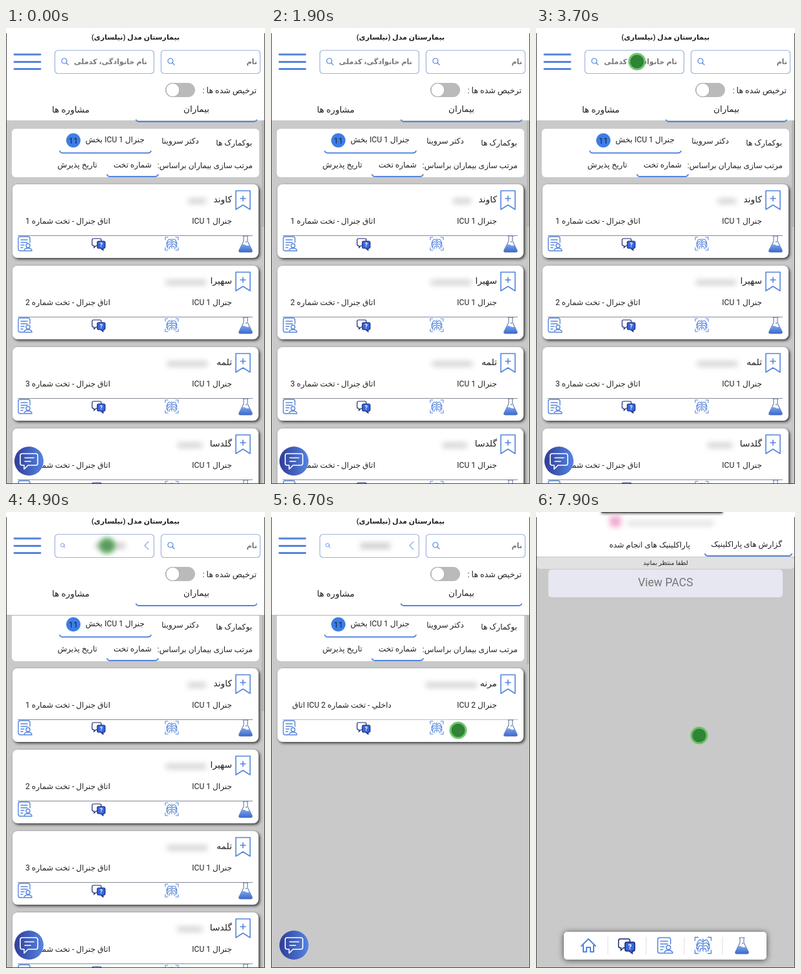
Write an HTML page that moves like this. It is 400x706 px and loops after 8 s.

```html
<!DOCTYPE html>
<html lang="fa">
<head>
<meta charset="utf-8">
<title>Patient list</title>
<style>
  html, body { margin: 0; width: 100%; height: 100%; overflow: hidden; background: #c9c9c9; }
  svg { display: block; }
  text { direction: rtl; font: 12.1px Roboto, 'DejaVu Sans', sans-serif; fill: #222; }
  .mid { text-anchor: middle; }
  .bold { font-weight: bold; }
  .line { fill: none; stroke: #5585dd; stroke-linecap: round; stroke-linejoin: round; }
  .card { fill: #fff; filter: drop-shadow(2px 2px 2px #333); }
  .blur { filter: blur(4px); }
  .step { opacity: 0; animation: 8s step-end infinite; }
  .typed { animation-name: typed; }
  #results { animation-name: results; }
  #report { animation-name: report; }
  #pointer { animation-name: pointer; }
  #path { animation: path 8s ease-in-out infinite; }
  #dot { animation: soften 8s step-end infinite; }
  @keyframes typed { 0% { opacity: 0 } 52.5% { opacity: 1 } }
  @keyframes results { 0% { opacity: 0 } 67.5% { opacity: 1 } }
  @keyframes report { 0% { opacity: 0 } 96.25% { opacity: 1 } }
  @keyframes pointer { 0% { opacity: 0 } 42.5% { opacity: 1 } }
  @keyframes soften {
    0%, 75% { filter: none; opacity: 1 }
    52.5% { filter: blur(3.5px); opacity: .75 }
  }
  @keyframes path {
    0%, 75% { transform: translate(156px, 52px) }
    82%, 85.5% { transform: translate(289px, 338px) }
    90%, 95.5% { transform: translate(257px, 337px) }
    97.5%, 100% { transform: translate(252px, 346px) }
  }
</style>
</head>
<body>
<svg width="400" height="706" viewBox="0 0 400 706">
  <defs>
    <linearGradient id="fabFill"><stop stop-color="#2f3d98"/><stop offset="1" stop-color="#5584e2"/></linearGradient>
    <linearGradient id="liquid" x2="0" y2="1"><stop stop-color="#7ba4ee"/><stop offset="1" stop-color="#3c69cc"/></linearGradient>

    <g id="flask">
      <path class="line" stroke-width="1.1" style="stroke:#5f779f" d="M-4-12H4M-3-12V-4L-10 10Q-11 13-8 13H8Q11 13 10 10L3-4V-12"/>
      <path fill="url(#liquid)" d="M-6.5 2Q-3 0 0 2T6.5 2L10 10Q11 13 8 13H-8Q-11 13-10 10Z"/>
      <circle cx="1" cy="-3" r="1" fill="#5585dd"/>
    </g>
    <g id="ribs" class="line" stroke-width="1.1">
      <path d="M-10-6V-10H-6M6-10H10V-6M10 6V10H6M-6 10H-10V6M0-8V7"/>
      <g id="ribSide"><path d="M-1-5Q-4-9-6-5T-8 0M-1-2Q-5-5-7 0T-7 4M-1 1Q-5-1-6 3T-6 7M-1 4Q-4 3-4 8"/></g>
      <use href="#ribSide" transform="scale(-1 1)"/>
    </g>
    <g id="chat">
      <path d="M-8-8H2Q4-8 4-6V1Q4 3 2 3H-4L-7 6V3H-8Q-10 3-10 1V-6Q-10-8-8-8Z" fill="#fff" stroke="#152072" stroke-width="1.2"/>
      <path d="M0-4H8Q10-4 10-2V5Q10 7 8 7H7V10L3 7H0Q-2 7-2 5V-2Q-2-4 0-4Z" fill="#3768de" stroke="#152072" stroke-width="1.2"/>
      <text class="mid bold" x="4" y="5" style="font-size:9px;fill:#fff">?</text>
    </g>
    <g id="record" class="line" stroke-width="1.4">
      <path d="M-2 11H-7Q-10 11-10 8V-8Q-10-11-7-11H5Q8-11 8-8V-2M-6-6H4M-6-2H4M-6 2H-1M-6 6H-3"/>
      <circle cx="5" cy="3" r="3"/>
      <path d="M-1 11Q-1 7 5 7T11 11Z"/>
    </g>
    <g id="lens" class="line" stroke-width="1.2"><circle cx="-1" cy="-1" r="4"/><path d="M2 2L5 5"/></g>
    <path id="bookmark" class="line" stroke-width="1.6" d="M-11-15H11V14L0 7L-11 14ZM-4-3H4M0-7V1"/>
  </defs>

  <rect width="400" height="706" fill="#c9c9c9"/>
  <rect x="395" y="143" width="4" height="165" fill="#b8b8b8"/>
  <rect x="9" y="156" width="382" height="75" rx="6" fill="#fff"/>
  <text x="380" y="182">بوکمارک ها</text>
  <text x="298" y="179">دکتر سروینا</text>
  <text x="214" y="177">جنرال ICU 1 بخش</text>
  <circle cx="104" cy="174" r="11" fill="#3e7de4"/>
  <text class="mid" x="104" y="178.5" style="font-size:13px;fill:#14264f">11</text>
  <text x="381" y="217">مرتب سازی بیماران براساس:</text>
  <text x="225" y="216">شماره تخت</text>
  <text x="141" y="216">تاریخ پذیرش</text>
  <g class="line" stroke-width="1.8">
    <path d="M83 190.500Q84 193.500 88 193.500H219Q223 193.500 224 190.500"/>
    <path d="M156 227Q157 230 161 230H230Q234 230 235 227"/>
  </g>
  <g id="patients"></g>
  <g id="results" class="step"><rect x="1" y="236" width="398" height="470" fill="#c9c9c9"/></g>

  <rect width="400" height="143" fill="#fff"/>
  <g class="step typed">
    <rect y="142" width="400" height="18" fill="#fff"/>
    <path d="M0 160H400" stroke="#aaa"/>
  </g>
  <text class="mid bold" x="200" y="18" style="font-size:11px">بیمارستان مدل (نیلساری)</text>
  <path class="line" stroke-width="2.8" d="M13 41H53M13 52.500H53M13 63.500H53"/>
  <g fill="#fff" stroke="#9fb4dc" stroke-width="1.2">
    <rect x="75.5" y="34.5" width="153" height="36" rx="5"/>
    <rect x="239.5" y="34.5" width="153" height="36" rx="5"/>
  </g>
  <use href="#lens" x="255" y="52"/>
  <text class="bold" x="388" y="56" style="font-size:11.2px;fill:#777">نام</text>
  <use href="#lens" x="91" y="52"/>
  <text class="bold" x="218" y="56" style="font-size:11.2px;fill:#777">نام خانوادگی، کدملی</text>
  <g class="step typed">
    <rect x="78" y="37" width="148" height="31" fill="#fff"/>
    <use href="#lens" transform="translate(88 52) scale(.7)"/>
    <path class="line" stroke-width="1.2" opacity=".7" d="M220 46L214 52L220 58"/>
    <rect class="blur" x="138" y="48" width="46" height="9" fill="#999" opacity=".5"/>
  </g>
  <rect x="246" y="85" width="46" height="22" rx="11" fill="#bababa"/>
  <circle cx="257.500" cy="96" r="10.500" fill="#fff" stroke="#a5a5a5"/>
  <text x="387" y="101" style="font-size:12.5px">ترخیص شده ها :</text>
  <text class="mid" x="294" y="130" style="font-size:13.5px">بیماران</text>
  <text class="mid" x="100" y="131" style="font-size:13.5px">مشاوره ها</text>
  <path class="line" stroke-width="2" d="M201 142.500Q202 145 206 145H382Q386 145 387 142.500"/>

  <circle cx="35.500" cy="670.500" r="22.500" fill="url(#fabFill)"/>
  <path d="M25 659H46Q49 659 49 662V674Q49 677 46 677H34L28 683V677H25Q22 677 22 674V662Q22 659 25 659ZM29 665.500H43M29 671H38"
    fill="none" stroke="#fff" stroke-width="1.6" stroke-linejoin="round" stroke-linecap="round"/>

  <g id="report" class="step">
    <rect width="400" height="706" fill="#c9c9c9"/>
    <rect width="400" height="69" fill="#fff"/>
    <rect x="101" y="-4" width="187" height="5" fill="#444" style="filter:drop-shadow(0 1px 2px #333)"/>
    <rect class="blur" x="114" y="6" width="17" height="17" fill="#ee94c2" opacity=".8"/>
    <rect class="blur" x="141" y="13" width="133" height="9" fill="#bbb" opacity=".4"/>
    <text x="380" y="54">گزارش های پاراکلینیک</text>
    <text x="238" y="55">پاراکلینیک های انجام شده</text>
    <path class="line" stroke-width="2" d="M261 65Q262 68 266 68H390Q394 68 395 65"/>
    <rect x="1" y="70" width="398" height="18" rx="5" fill="#e1e1e1"/>
    <text class="mid" x="200" y="82" style="font-size:9.6px">لطفا منتظر بمانید</text>
    <rect x="19" y="89" width="362" height="43" rx="5" fill="#e6e7f0"/>
    <text class="mid" x="200" y="115" style="font-size:17.5px;fill:#777">View PACS</text>
    <rect x="43" y="650" width="313" height="43" rx="5" fill="#fff" style="filter:drop-shadow(0 1px 5px #444)"/>
    <path d="M111 658V685M170 658V685M229 658V685M288 658V685" stroke="#ddd"/>
    <path class="line" stroke-width="2" d="M70 672L81 661L92 672M73 670V681H78V674H84V681H89V670"/>
    <use href="#chat" transform="translate(140 671) scale(1.25)"/>
    <use href="#record" transform="translate(199 671) scale(1.1)"/>
    <use href="#ribs" transform="translate(258 671) scale(1.25)"/>
    <use href="#flask" x="318" y="671"/>
  </g>

  <path d="M.5 8V705.500H399.500V8" fill="none" stroke="#444"/>
  <g id="pointer" class="step">
    <g id="path">
      <g id="dot">
        <circle r="13.500" fill="#58bd58" opacity=".85"/>
        <circle r="10.500" fill="#2f8435"/>
      </g>
    </g>
  </g>
</svg>
<script>
  // Each card: given name, left and right edge of the blurred surname, ward, room.
  const card = (row, [name, left, right, ward, room], rule) => `
    <g transform="translate(0 ${242 + row * 126})">
      <rect class="card" x="10" width="380" height="114" rx="8"/>
      <text x="349" y="28" style="font-size:13.8px">${name}</text>
      <rect class="blur" x="${left}" y="22" width="${right - left}" height="8" fill="#888" opacity=".38"/>
      <use href="#bookmark" x="366" y="25"/>
      <text x="349" y="61">${ward}</text>
      <text x="${room.includes('ICU') ? 186 : 161}" y="61">${room}</text>
      <path d="M18 79.500H381" stroke="${rule}"/>
      <use href="#record" x="29" y="92"/>
      <use href="#chat" x="143" y="92"/>
      <use href="#ribs" x="256" y="92"/>
      <use href="#flask" x="370" y="92"/>
    </g>`;
  const add = (id, markup) => document.getElementById(id).insertAdjacentHTML('beforeend', markup);

  const patients = [['کاوند', 281, 309], ['سهیرا', 247, 309], ['تلمه', 249, 311], ['گلدسا', 265, 303]];
  add('patients', patients.map((p, i) =>
    card(i, [...p, 'جنرال ICU 1', `اتاق جنرال - تخت شماره ${i + 1}`], '#858a94')).join(''));
  add('results', card(0, ['مرنه', 239, 318, 'جنرال ICU 2', 'داخلي - تخت شماره ICU 2 اتاق'], '#b4bdd0'));
</script>
</body>
</html>
```
